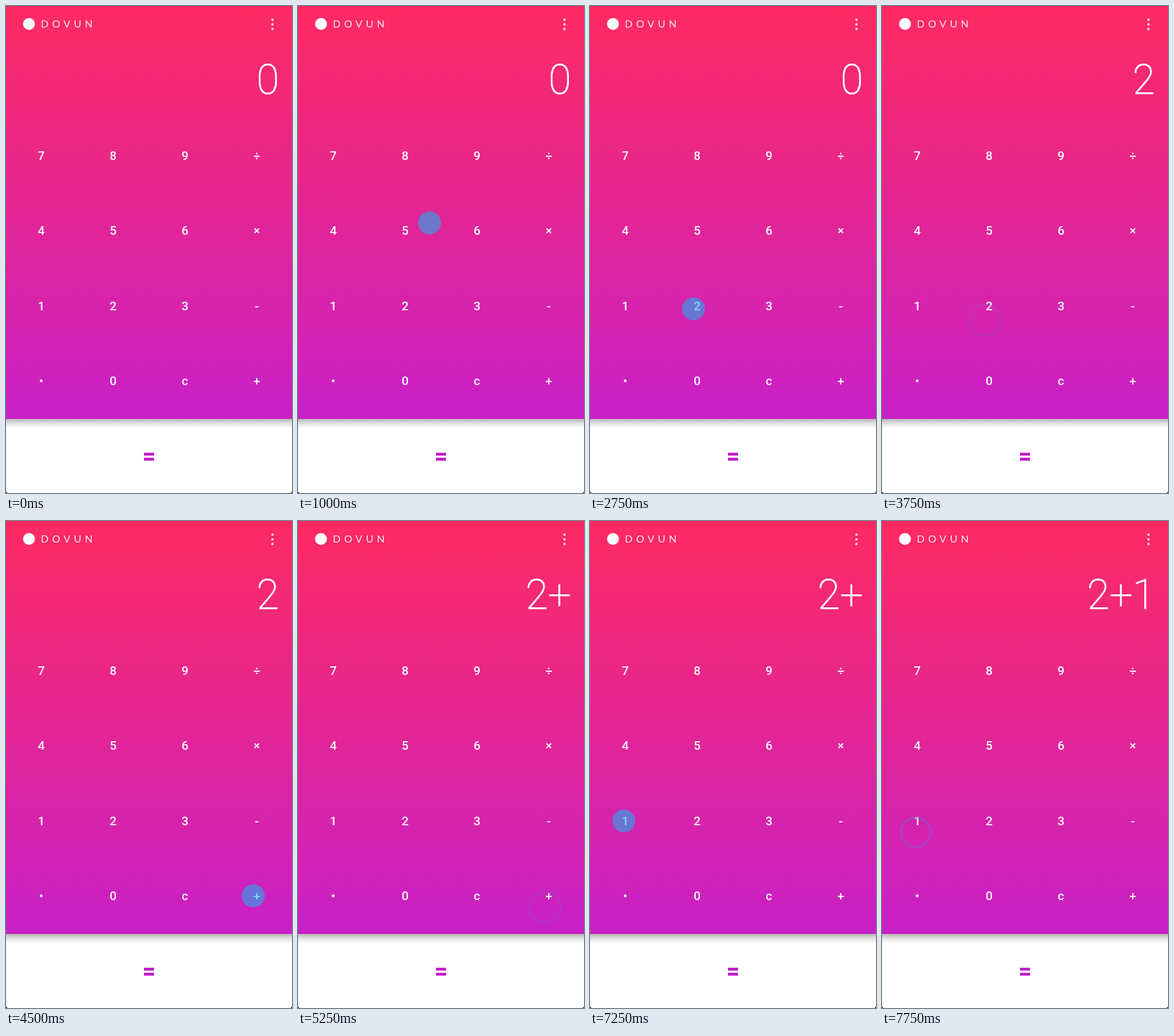
These frames come from a looping animation (398 by 677 pixels, 8 s). An HTML page:

```html
<!DOCTYPE html>
<html lang="en">
<head>
<meta charset="utf-8">
<title>Calculator</title>
<style>
  html, body { margin: 0; width: 100%; height: 100%; overflow: hidden; background: #fff; }
  svg { display: block; width: 398px; height: 677px; }
  .keys { font: 500 17px Roboto, sans-serif; text-anchor: middle; fill: #fff; }
  .name { font: 400 14px Lato, sans-serif; letter-spacing: 5px; fill: #fff; fill-opacity: .9; }
  .display { font: 100 57px Roboto, sans-serif; text-anchor: end; fill: #fff; stroke: #fff; }
</style>
</head>
<body>
<svg viewBox="0 0 398 677">
  <defs>
    <linearGradient id="panel" x2="0" y2="1">
      <stop stop-color="#fe2a62"/>
      <stop offset="1" stop-color="#c820c8"/>
    </linearGradient>
    <linearGradient id="shade" x2="0" y2="1">
      <stop stop-opacity=".3"/>
      <stop offset=".45" stop-opacity=".13"/>
      <stop offset="1" stop-opacity="0"/>
    </linearGradient>
  </defs>
  <rect width="398" height="677" fill="#fff"/>
  <rect y="574" width="398" height="13" fill="url(#shade)"/>
  <rect width="398" height="574" fill="url(#panel)"/>
  <path d="M0 675v2h2zM398 675v2h-2z" fill="#222"/>

  <circle cx="32" cy="25" r="8.3" fill="#fff"/>
  <text class="name" x="48.5" y="30">DOVUN</text>
  <path d="M370.8 19v0m0 6.5v0m0 6.5v0" stroke="#fff" stroke-width="3.4"
        stroke-linecap="round" stroke-opacity=".85"/>

  <text class="display" id="display" x="380" y="122">0</text>
  <g class="keys" id="keys"></g>
  <path d="M192 621h14v4h-14zM192 628h14v4h-14z" fill="#c41fcb"/>

  <circle id="cursor" r="16" fill="#14b8f3"/>
  <circle id="ring" fill="none" stroke="#5f70d8" stroke-width="3"/>
</svg>
<script>
const LOOP = 8000, STEP = 250;
const $ = id => document.getElementById(id);

["789÷", "456×", "123-", "•0c+"].forEach((row, r) => {
  [...row].forEach((label, c) => {
    const key = document.createElementNS("http://www.w3.org/2000/svg", "text");
    key.setAttribute("x", 49 + 100 * c);
    key.setAttribute("y", Math.round(214 + 104.4 * r));
    key.textContent = label;
    $("keys").append(key);
  });
});

// Each tap: the cursor shows, glides from one point to the next, then clicks.
const taps = [
  { show: 250, go: 750, stop: 2000, click: 3500, from: [330, 116], to: [144, 421], text: "2" },
  { show: 4250, go: 4250, stop: 4500, click: 5000, from: [344, 521], to: [344, 521], text: "2+" },
  { show: 5750, go: 6250, stop: 7250, click: 7750, from: [150, 417], to: [47, 417], text: "2+1" }
];

const clamp = v => Math.min(1, Math.max(0, v));
const easeOut = (p, power) => 1 - (1 - p) ** power;
const mix = (a, b, p) => a + (b - a) * p;

function set(el, attrs) {
  for (const name in attrs) el.setAttribute(name, attrs[name]);
}

function drawCursor(t) {
  const tap = taps.find(k => t >= k.show && t < k.click);
  if (!tap) return set($("cursor"), { opacity: 0 });
  const p = clamp((t - tap.go) / (tap.stop - tap.go));
  set($("cursor"), {
    // The sideways part settles first, which bends the path.
    cx: mix(tap.from[0], tap.to[0], easeOut(p, 7)),
    cy: mix(tap.from[1], tap.to[1], easeOut(p, 4.2)),
    opacity: t === tap.show ? .28 : .56
  });
}

function drawClick(t) {
  const tap = taps.filter(k => t >= k.click).pop();
  $("display").textContent = tap ? tap.text : "0";
  if (!tap) return set($("ring"), { opacity: 0 });
  const age = (t - tap.click) / STEP;
  set($("ring"), {
    cx: tap.to[0],
    cy: tap.to[1] + 16,
    r: 20.5 + age,
    opacity: Math.max(0, .4 - .2 * age)
  });
}

const start = performance.now();
function tick() {
  const t = Math.floor((performance.now() - start) % LOOP / STEP) * STEP;
  drawCursor(t);
  drawClick(t);
  requestAnimationFrame(tick);
}
tick();
</script>
</body>
</html>
```
